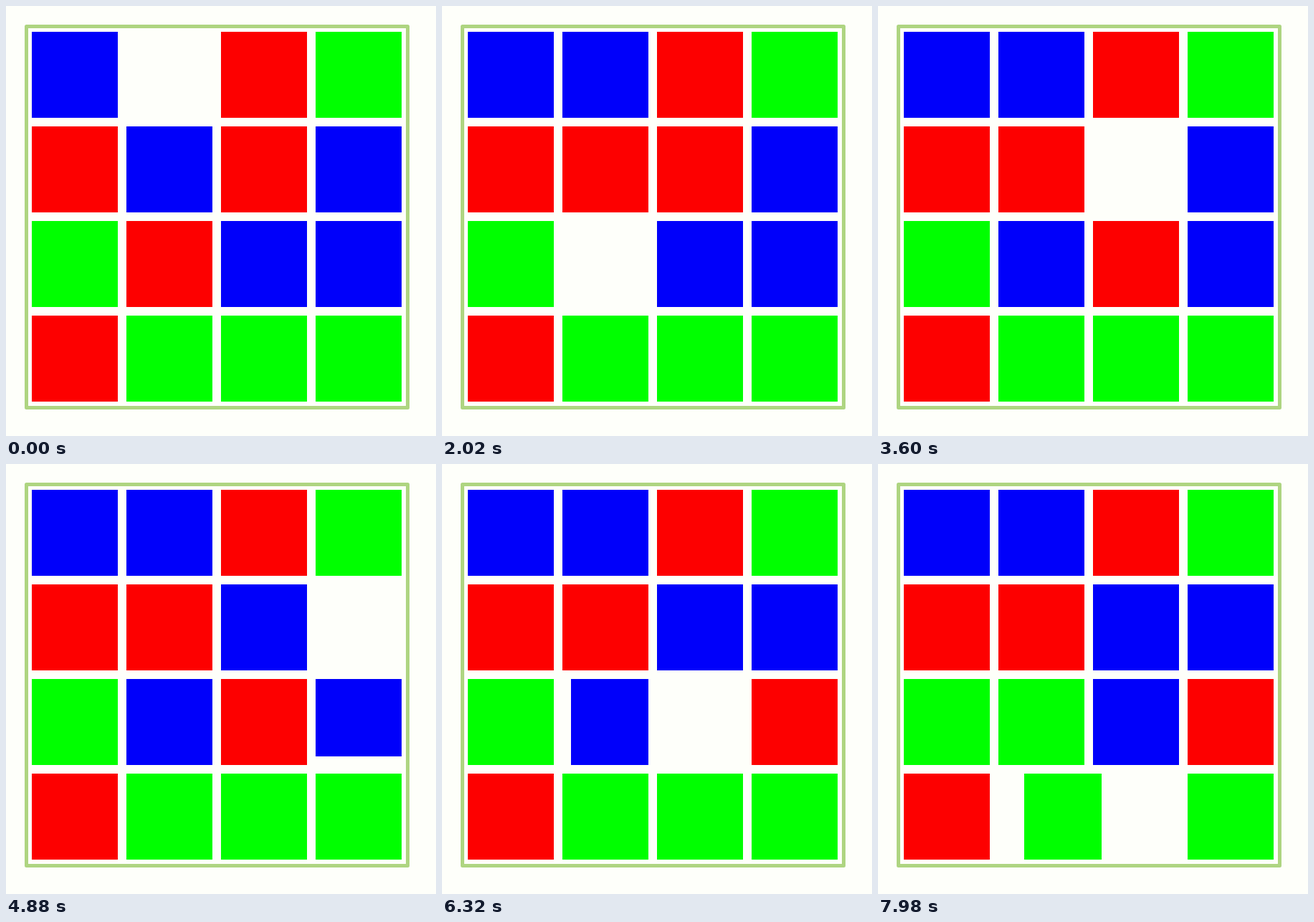
An HTML page with a canvas that plays this animation: 600 px wide and 600 px high, repeating every 8000 ms.

```html
<!DOCTYPE html>
<html>
<head>
<meta charset="utf-8">
<style>
  html, body { margin: 0; overflow: hidden; background: #fefffa; }
  canvas { display: block; }
</style>
</head>
<body>
<canvas id="stage" width="600" height="600"></canvas>
<script>
const ctx = document.getElementById('stage').getContext('2d');
const LOOP = 8000, TICK = 20, STEP = 12, PITCH = 132, SIZE = 120, EDGE = 36;
const COLORS = { R: '#fd0000', G: '#0f0', B: '#0000fa' };
const START = 'B.RGRBRBGRBBRGGG';
// Each move: start time, cell left, cell entered (cells count row by row)
const MOVES = [
  [1000, 5, 1], [1800, 9, 5], [2580, 10, 9], [3320, 6, 10], [4140, 7, 6],
  [4880, 11, 7], [5600, 10, 11], [6320, 9, 10], [7100, 13, 9], [7820, 14, 13]
];
const cellX = i => EDGE + i % 4 * PITCH;
const cellY = i => EDGE + Math.floor(i / 4) * PITCH;

function drawTile(kind, x, y, w = SIZE, h = SIZE) {
  ctx.fillStyle = COLORS[kind];
  ctx.fillRect(x, y, w, h);
}

// A sliding tile lacks a strip, one step wide, along its leading edge
function drawSliding(kind, from, to, step) {
  const dx = Math.sign(cellX(to) - cellX(from));
  const dy = Math.sign(cellY(to) - cellY(from));
  const x = cellX(from) + dx * step * STEP + (dx < 0 ? STEP : 0);
  const y = cellY(from) + dy * step * STEP + (dy < 0 ? STEP : 0);
  drawTile(kind, x, y, SIZE - Math.abs(dx) * STEP, SIZE - Math.abs(dy) * STEP);
}

function draw(t) {
  ctx.fillStyle = '#fefffa';
  ctx.fillRect(0, 0, 600, 600);
  ctx.strokeStyle = '#aed581';
  ctx.lineWidth = 5;
  ctx.lineJoin = 'round';
  ctx.strokeRect(28.5, 28.5, 532, 532);

  const cells = [...START];
  for (const [start, from, to] of MOVES) {
    if (t < start) break;
    const step = Math.floor((t - start) / TICK) + 1;
    const kind = cells[from];
    cells[from] = '.';
    if (step * STEP > PITCH) cells[to] = kind;
    else drawSliding(kind, from, to, step);
  }
  cells.forEach((kind, i) => {
    if (kind !== '.') drawTile(kind, cellX(i), cellY(i));
  });
}

const origin = performance.now();
function frame() {
  draw((performance.now() - origin) % LOOP);
  requestAnimationFrame(frame);
}
frame();
</script>
</body>
</html>
```
